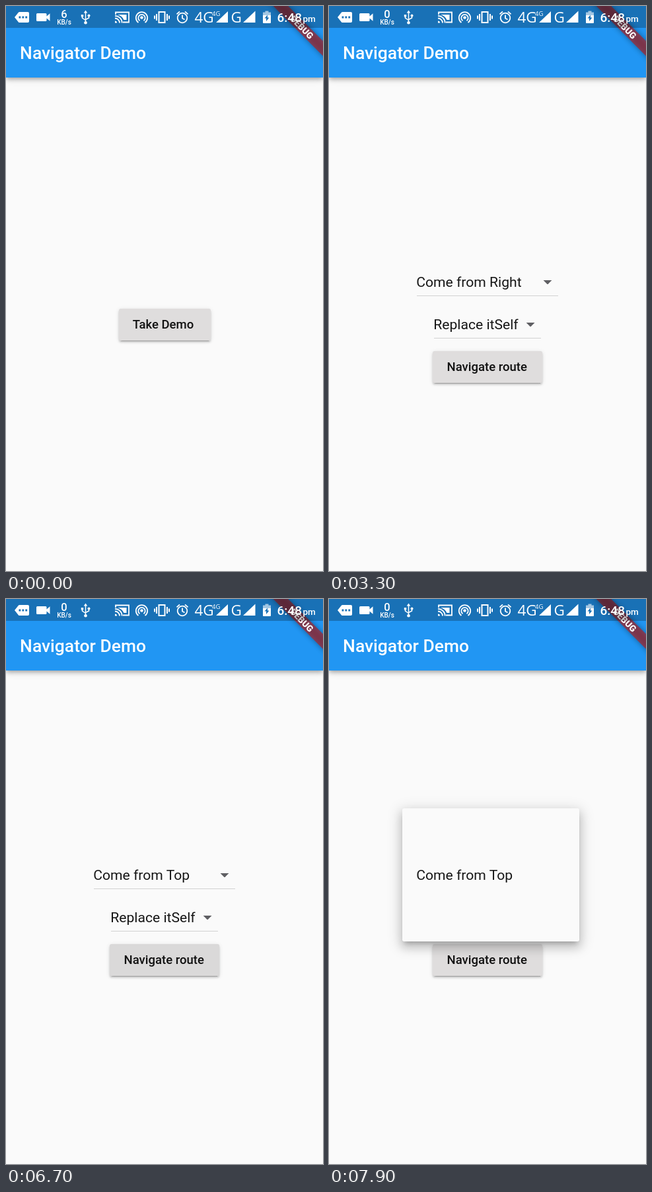
Animation, 480 px wide and 853 px high, one loop 8 s. Source, as an HTML page:

```html
<!DOCTYPE html>
<html lang="en">
<head>
<meta charset="utf-8">
<title>Navigator Demo</title>
<style>
  html, body { margin: 0; width: 100%; height: 100%; overflow: hidden; background: #fafafa; }
  body { font-family: Roboto, sans-serif; }
  #stage { position: absolute; left: 0; top: 0; width: 480px; height: 853px; overflow: hidden; }
  #stage div { position: absolute; white-space: pre; }
  .page { left: 0; top: 0; width: 480px; height: 853px; overflow: hidden; background: #fafafa; }
  .bar {
    left: 0; top: 0; width: 480px; height: 107.5px; background: #2196f3;
    box-shadow: 0 2.7px 5.3px -1.3px #0003, 0 5.3px 6.7px #00000024, 0 1.3px 13.3px #0000001f;
  }
  .title { left: 21.1px; top: 51.3px; font: 500 26.45px/40px Roboto, sans-serif; color: #fff; }
  .button {
    height: 48px; border-radius: 2.7px; background: #dfdddd; overflow: hidden;
    box-shadow: 0 4px 1.3px -2.7px #0003, 0 2.7px 2.7px #00000024, 0 1.3px 6.7px #0000001f;
  }
  .caption { left: 21.2px; top: 0; font: 500 18.55px/48px Roboto, sans-serif; color: #111; }
  .ink { left: 0; top: 0; width: 100%; height: 100%; background: #bcbcbc; opacity: 0; }
  .label { left: -0.4px; top: 0; font: 400 21.12px/64px Roboto, sans-serif; color: #161616; }
  .field { height: 64px; }
  .rule { left: 0; top: 52.4px; width: 100%; height: 1px; background: #d2d2d2; }
  .arrow {
    right: 9.3px; top: 29px; width: 13.4px; height: 6.7px; background: #5f5f63;
    clip-path: polygon(0 0, 100% 0, 50% 100%);
  }
  .seam { left: 0; top: 0; width: 1px; height: 113px; background: #ffffff50; }
  #menu {
    left: 111px; width: 268px; border-radius: 2.7px; background: #fafafa; overflow: hidden;
    box-shadow: 0 6.7px 6.7px -4px #0003, 0 8px 13.3px 1.3px #00000024, 0 5px 20px 5px #0000001f;
  }
  #menu .label { left: 21.3px; }
  svg { position: absolute; left: 0; top: 0; }
</style>
</head>
<body>
<div id="stage">
  <svg width="480" height="853" viewBox="0 0 480 853">
    <defs>
      <filter id="soft" x="-20%" y="-100%" width="140%" height="300%"><feGaussianBlur stdDeviation="4"/></filter>
    </defs>
    <g transform="translate(480 0) rotate(45)">
      <rect x="-75" y="37.3" width="150" height="16" opacity=".38" filter="url(#soft)"/>
      <rect x="-75" y="37.3" width="150" height="16" fill="#b71c1c" opacity=".63"/>
      <text y="50.1" text-anchor="middle" font-size="13.5" font-weight="900" fill="#fff">DEBUG</text>
    </g>
    <rect width="480" height="33" opacity=".25"/>
    <g fill="#fff" fill-rule="evenodd">
      <path d="M13 17L19 9.6Q19.6 9 20.5 9H33Q35 9 35 11V23Q35 25 33 25H20.5Q19.6 25 19 24.4ZM19.5 15.6h2.8v2.8h-2.8zM24.4 15.6h2.8v2.8h-2.8zM29.3 15.6h2.8v2.8h-2.8z"/>
      <path d="M47.5 11H60Q61.5 11 61.5 12.5V15.6L66.5 11.2V22.8L61.5 18.4V21.5Q61.5 23 60 23H47.5Q46 23 46 21.5V12.5Q46 11 47.5 11Z"/>
      <g text-anchor="middle" font-weight="500">
        <text id="rate" x="88" y="18" font-size="16.5">6</text>
        <text x="88" y="28" font-size="10">KB/s</text>
      </g>
      <path d="M120.5 6.5l2.8 4h-5.6zM113.8 13h3.4v3.4h-3.4z"/>
      <circle cx="125.5" cy="14.5" r="2"/>
      <circle cx="120.5" cy="25.2" r="2.3"/>
      <path d="M165 22.5a3 3 0 0 1 3 3h-3z"/>
      <circle cx="205.5" cy="17.5" r="2.3"/>
      <path d="M318 25L336 8V25ZM359 25L377.5 7.5V25Z"/>
      <path d="M392.5 7.5h5v2h3.5v4H389v-4h3.5z" opacity=".6"/>
      <path d="M389 13.5h12V25q0 1-1 1h-10q-1 0-1-1zM396 13.5l-4.500 5h2.500v4.500l4.500-5.500h-2.500z"/>
      <g font-family="'Open Sans', sans-serif">
        <text x="285.5" y="25" font-size="22.5">4G</text>
        <text x="312" y="15" font-size="9.5">4G</text>
        <text x="340.5" y="25" font-size="22.5">G</text>
      </g>
      <text x="410.5" y="24" font-size="19" font-weight="500">6:48</text>
      <text x="449.5" y="24" font-size="13.5" font-weight="500">pm</text>
    </g>
    <g fill="none" stroke="#fff" stroke-width="1.8">
      <path d="M120.5 9V25M115.5 16v2l5 3.5M125.5 15v3l-5 2.5" stroke-width="1.5"/>
      <path d="M166 13V9.5H186V24.5H177M165 18.5a7 7 0 0 1 7 7M165 14.8a10.7 10.7 0 0 1 10.7 10.7"/>
      <path d="M169 13H182.5V21H178.5Q176 15 169 13Z" fill="#fff" stroke="none"/>
      <path d="M202.5 22.3a5.2 5.2 0 1 1 6 0M200.5 25a8.7 8.7 0 1 1 10 0"/>
      <path d="M231.5 9H240.5V25H231.5ZM228 12v10M244 12v10M225 14.5v5M247 14.5v5" stroke-width="2"/>
      <circle cx="267" cy="18" r="7.3"/>
      <path d="M267 13.5v5l3.5 2M258.5 12.3l4.5-4M275.5 12.3l-4.5-4"/>
    </g>
  </svg>
</div>
<script>
const LOOP = 8000, STEP = 100, ROW = 64, PAD = 10.67;
const OPTIONS = ['Come from Left', 'Come from Right', 'Come from Top', 'Come from Bottom', ''];
const RIGHT = 1, TOP = 2;
const MENU_HEIGHT = OPTIONS.length * ROW + 2 * PAD;
const stage = document.getElementById('stage');
const overlay = stage.querySelector('svg');
const rate = document.getElementById('rate');

const clamp = v => Math.max(0, Math.min(1, v));
const mix = (a, b, p) => a + (b - a) * p;
const show = (el, on) => { el.style.display = on ? 'block' : 'none'; };

function add(parent, cls, style = {}, text = '') {
  const el = document.createElement('div');
  el.className = cls;
  el.textContent = text;
  Object.assign(el.style, style);
  parent.appendChild(el);
  return el;
}

function addPage() {
  const el = add(stage, 'page');
  add(add(el, 'bar'), 'title', {}, 'Navigator Demo');
  return { el };
}

function addButton(page, x, y, width, text) {
  const el = add(page.el, 'button', { left: x + 'px', top: y + 'px', width: width + 'px' });
  page.ink = add(el, 'ink');
  add(el, 'caption', {}, text);
}

function addField(page, x, y, width, text) {
  const el = add(page.el, 'field', { left: x + 'px', top: y + 'px', width: width + 'px' });
  add(el, 'rule');
  add(el, 'arrow');
  return add(el, 'label', {}, text);
}

function addForm() {
  const page = addPage();
  page.choice = addField(page, 132.7, 384.7, 214.3, OPTIONS[RIGHT]);
  addField(page, 158.7, 448.7, 162.4, 'Replace itSelf');
  addButton(page, 157.3, 520.5, 165.4, 'Navigate route');
  page.seam = add(page.el, 'seam');
  return page;
}

const home = addPage();
addButton(home, 170.5, 456.5, 139, 'Take Demo');
const under = addForm();
const form = addForm();
const menu = add(stage, '');
menu.id = 'menu';
const items = OPTIONS.map(text => add(menu, 'label', {}, text));
stage.appendChild(overlay);

const SLIDES = [{ at: 2160, dx: 478, dy: 0 }, { at: 6860, dx: 0, dy: -849 }];
const MENUS = [{ at: 3945, close: 4760, sel: RIGHT }, { at: 7788, close: 9000, sel: TOP }];
const PRESSES = [680, 1960, 6660];

const pressed = t => Math.max(...PRESSES.map(at =>
  Math.min(clamp((t - at) / 120), clamp((at + 380 - t) / 120))));

function drawForms(t) {
  const slide = SLIDES.find(s => t >= s.at && t < s.at + 300);
  const label = OPTIONS[t < 4760 ? RIGHT : TOP];
  const ink = pressed(t) * 0.4;
  let x = 0, y = 0, alpha = 1;
  if (slide) {
    const left = 1 - (t - slide.at) / 300;
    x = slide.dx * left;
    y = slide.dy * left;
  } else if (t < 1000) {
    // the entrance barely begins before the page snaps into place
    y = 181;
    alpha = 0.06;
  }
  show(under.el, slide);
  show(form.el, t >= 900);
  show(form.seam, x > 0);
  under.choice.textContent = form.choice.textContent = label;
  home.ink.style.opacity = under.ink.style.opacity = ink;
  form.ink.style.opacity = slide || t < 1500 ? 0 : ink;
  form.el.style.transform = `translate(${x}px, ${y}px)`;
  form.el.style.opacity = alpha;
}

function drawMenu(t) {
  const open = MENUS.find(m => t >= m.at && t < m.close + 75);
  show(menu, open);
  if (!open) return;
  const p = clamp((t - open.at) / 300);
  const grow = clamp((p - 0.25) / 0.25);
  const start = PAD + open.sel * ROW;
  const top = mix(start, 0, grow);
  const bottom = mix(start + ROW, MENU_HEIGHT, grow);
  const fade = t < open.close ? clamp(p / 0.25) : clamp(1 - (t - open.close) / 75);
  menu.style.top = 384.7 - start + top + 'px';
  menu.style.height = bottom - top + 'px';
  menu.style.opacity = fade;
  const unit = 0.5 / (OPTIONS.length + 1.5);
  items.forEach((item, i) => {
    item.style.top = PAD + i * ROW - top + 'px';
    item.style.opacity = i === open.sel ? 1 : clamp((p - 0.5 - (i + 1) * unit) / (1.5 * unit));
  });
}

function draw(now) {
  const t = Math.floor((now % LOOP) / STEP) * STEP;
  drawForms(t);
  drawMenu(t);
  rate.textContent = t < 500 || (t >= 4400 && t < 5900) ? '6' : '0';
}

const began = performance.now();
function tick() {
  draw(performance.now() - began);
  requestAnimationFrame(tick);
}
tick();
</script>
</body>
</html>
```
